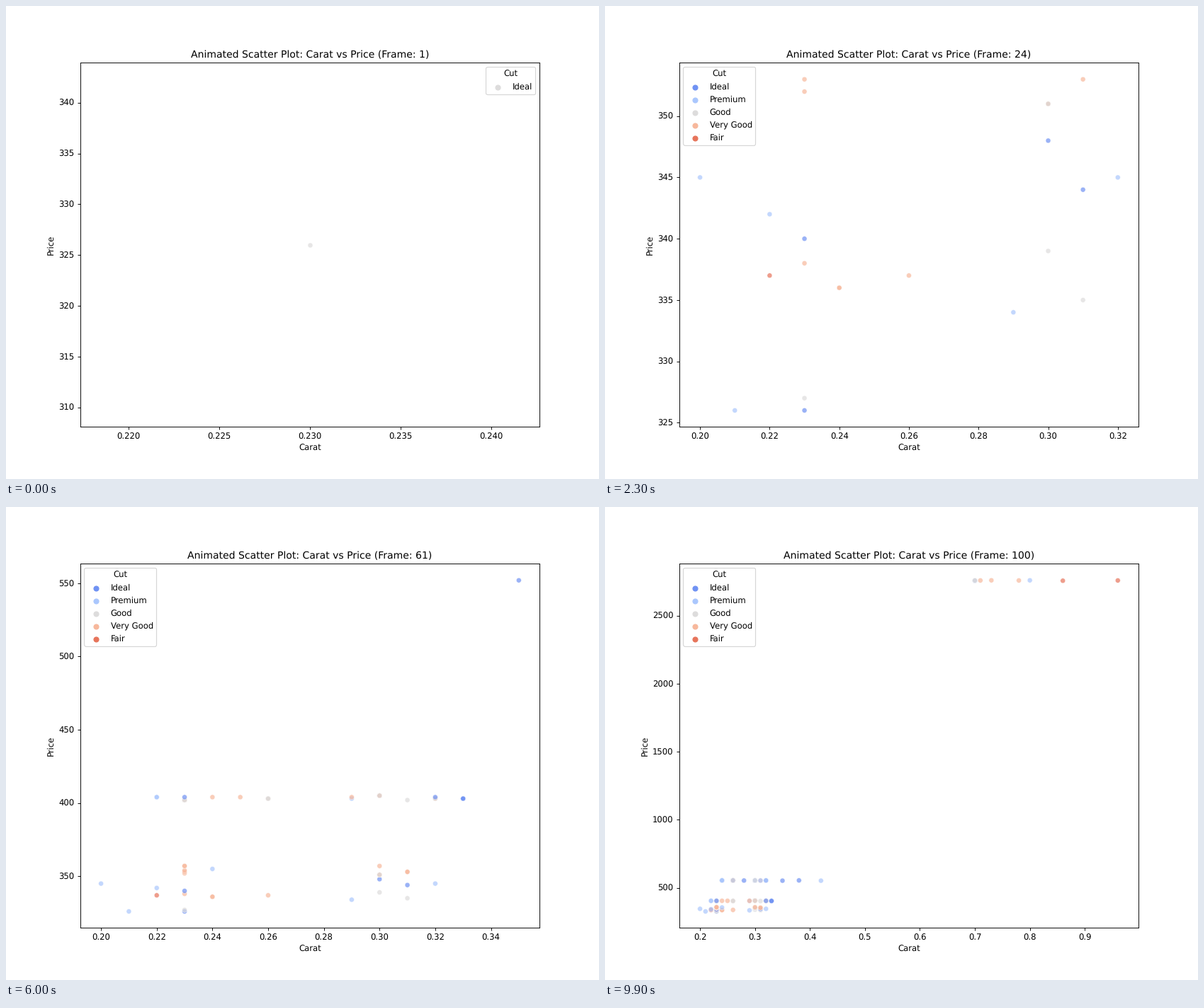
Write a matplotlib script that moves like this. It is 837 px wide and 669 px high and loops after 10000 ms.

```python
import numpy as np
import matplotlib.pyplot as plt
from matplotlib.animation import FuncAnimation

WIDTH, HEIGHT, DPI = 837, 669, 83.68
CUTS = {"I": "Ideal", "P": "Premium", "G": "Good", "V": "Very Good", "F": "Fair"}

# Diamonds by price: initial of the cut and hundredths of a carat
STONES = {
    326: "I23 P21", 327: "G23", 334: "P29", 335: "G31", 336: "V24 V24",
    337: "V26 F22", 338: "V23", 339: "G30", 340: "I23", 342: "P22",
    344: "I31", 345: "P20 P32", 348: "I30", 351: "G30 G30 V30 G30",
    352: "V23", 353: "V23 V31 V31", 354: "V23", 355: "P24",
    357: "V30 V23 V23",
    402: "V23 V23 V23 V23 V23 G23 G23 G31",
    403: "V26 I33 I33 I33 G26 G26 G32 P29 V32 G32",
    404: "V25 V29 V24 I23 I32 P22 P22",
    405: "I30 P30 V30 V30 G30",
    552: "I35 P30 I30 I30 P42",
    553: "I28 I32 V31 P31 P24 V24",
    554: "V30 P30 P30 G30 V26 V26 V26 V26 V26 V26 V26 I26 I38 G26 "
         "P24 P24 P24 P24 P32",
    2757: "I70 F86 I70",
    2759: "V71 V78 G70 G70 F96",
    2760: "V73 P80",
}
ROWS = [(int(stone[1:]) / 100, price, CUTS[stone[0]])
        for price, stones in STONES.items() for stone in stones.split()]

# Unhinted glyphs keep their true height at this resolution
plt.rcParams.update({"font.family": "DejaVu Sans", "text.hinting": "none"})
# The tiny margin keeps float rounding from cutting off a pixel
fig = plt.figure(figsize=((WIDTH + 1e-6) / DPI, (HEIGHT + 1e-6) / DPI), dpi=DPI)
ax = fig.add_subplot()


def palette(cuts):
    stops = np.linspace(0, 1, len(cuts) + 2)[1:-1]
    return dict(zip(cuts, plt.get_cmap("coolwarm")(stops)))


def draw(i):
    ax.clear()
    carat, price, cut = zip(*ROWS[:i + 1])
    colors = palette(list(dict.fromkeys(cut)))
    ax.scatter(carat, price, c=[colors[name] for name in cut], s=36,
               alpha=0.7, edgecolor="w", linewidth=0.48)
    for name, color in colors.items():
        ax.scatter([], [], color=[color], label=name)
    ax.legend(title="Cut", loc="best", labelspacing=0.545)
    ax.set_title(f"Animated Scatter Plot: Carat vs Price (Frame: {i + 1})")
    ax.set_xlabel("Carat")
    ax.set_ylabel("Price")


anim = FuncAnimation(fig, draw, frames=len(ROWS), interval=100,
                     repeat=True, repeat_delay=0)
plt.show()
```
